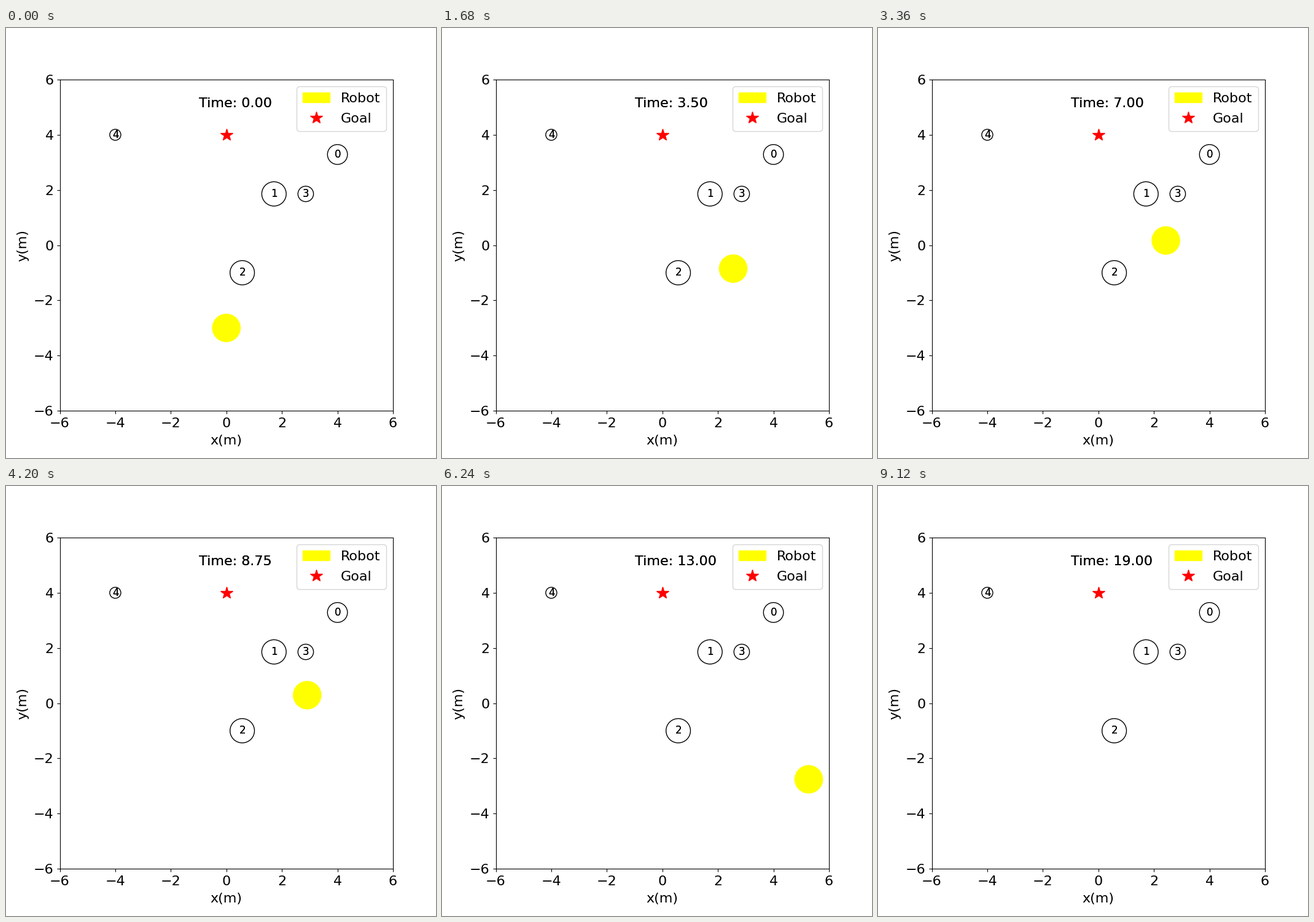
A matplotlib script that plays this animation: 700x700 px, repeating every 9240 ms.

```python
import numpy as np
import matplotlib.pyplot as plt
from matplotlib.animation import FuncAnimation
from matplotlib.lines import Line2D

FRAMES = 77
STEP = 0.25  # simulated seconds per frame
SIZE = 16

# Obstacles: x, y, radius
OBSTACLES = [
    (4, 23 / 7, 0.36),
    (12 / 7, 13 / 7, 0.44),
    (4 / 7, -1, 0.44),
    (20 / 7, 13 / 7, 0.28),
    (-4, 4, 0.2),
]

# Turning points of the robot's path: step, x, y
TURNS = np.array([
    (0, 0, -3), (8, 0.9, -2.7), (14, 2.55, -0.85), (21, 2.36, -0.08),
    (28, 2.43, 0.17), (35, 2.91, 0.29), (40, 3.53, -0.23),
    (48, 4.25, -1.52), (52, 5.27, -2.76), (55, 5.32, -3.84),
    (61, 3.81, -5.7), (68, 1.95, -7.2),
])
KNOTS, POINTS = TURNS[:, 0], TURNS[:, 1:]
SLOPES = np.gradient(POINTS, KNOTS, axis=0)
SLOPES[0] = 0  # starts at rest


def robot_position(step):
    """Smooth path through the turning points, ending out of view."""
    step = min(step, KNOTS[-1])
    k = min(np.searchsorted(KNOTS, step, side="right"), len(KNOTS) - 1) - 1
    span = KNOTS[k + 1] - KNOTS[k]
    u = (step - KNOTS[k]) / span
    ease = u * u * (3 - 2 * u)
    bend = (1 - u) * SLOPES[k] - u * SLOPES[k + 1]
    return (1 - ease) * POINTS[k] + ease * POINTS[k + 1] + u * (1 - u) * span * bend


def bold_text(x, y, label, size):
    """Text painted twice, which darkens its edges."""
    text = ax.text(x, y, label, fontsize=size, color="black")
    ax.add_artist(text)
    return text


plt.rcParams["font.family"] = "DejaVu Sans"
fig, ax = plt.subplots(figsize=(7, 7), dpi=100)
ax.set(xlim=(-6, 6), ylim=(-6, 6))
ax.tick_params(labelsize=SIZE)
ax.tick_params(axis="x", pad=4.6)
ax.set_xlabel("x(m)", fontsize=SIZE, labelpad=5.6)
ax.set_ylabel("y(m)", fontsize=SIZE, labelpad=5.8)

robot = plt.Circle((0, -3), 0.5, color="yellow")
goal = Line2D([0], [4], color="red", marker="*", linestyle="None",
              markersize=15)
ax.add_artist(robot)
ax.add_artist(goal)
ax.legend([robot, goal], ["Robot", "Goal"], fontsize=SIZE, loc="upper right",
          labelspacing=0.61, borderpad=0.43)

for i, (x, y, r) in enumerate(OBSTACLES):
    ax.add_artist(plt.Circle((x, y), r, fill=False))
    bold_text(x - 0.11, y - 0.11, str(i), 12)

clock = bold_text(-1, 5, "Time: 0.00", SIZE)


def update(frame):
    robot.center = tuple(robot_position(frame))
    clock.set_text(f"Time: {frame * STEP:.2f}")
    return robot, clock


anim = FuncAnimation(fig, update, frames=FRAMES, interval=120, repeat=True,
                     repeat_delay=0)
plt.show()
```
